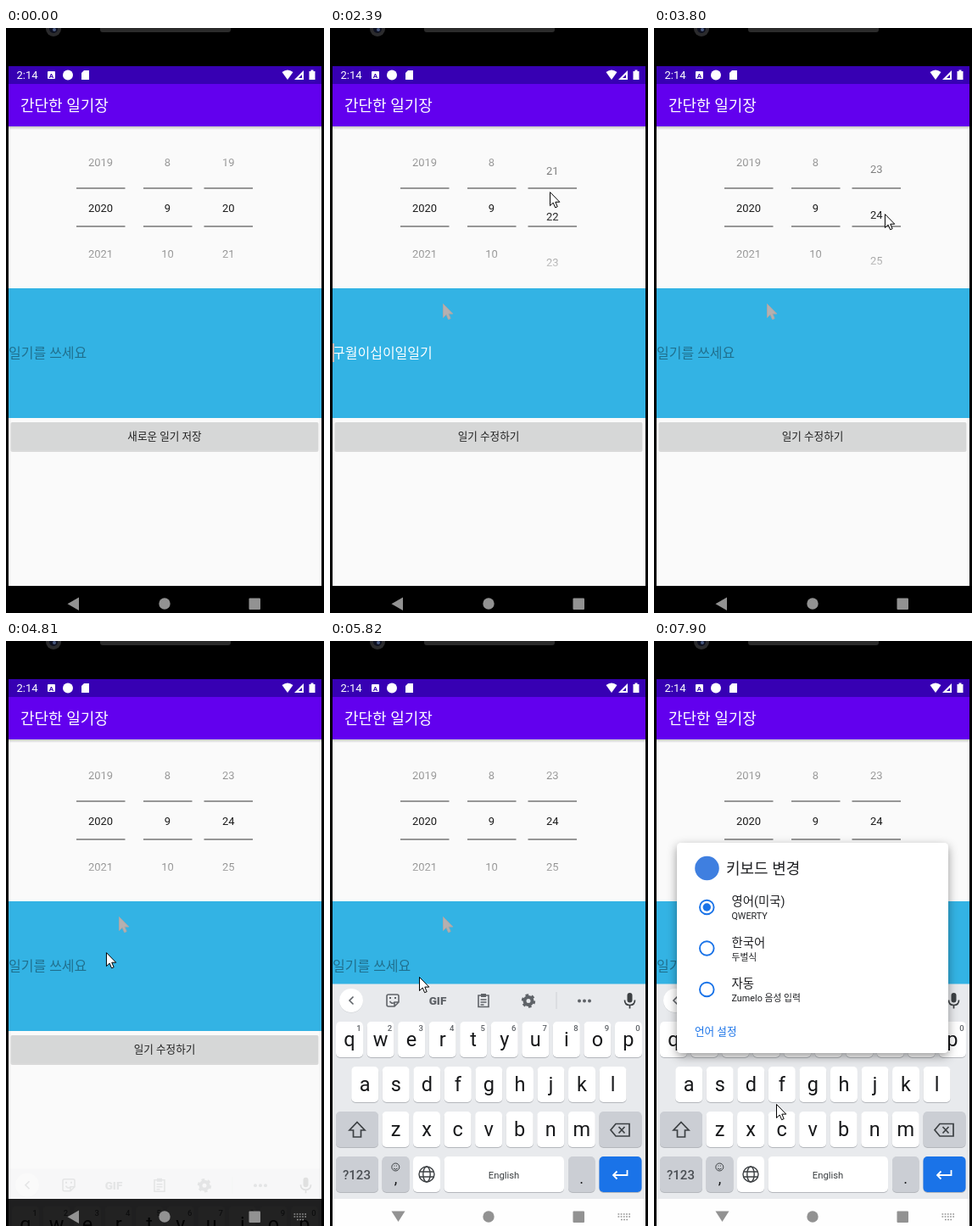
These frames come from a looping animation (375x690 px, 7990 ms). An HTML page:

```html
<!DOCTYPE html>
<html lang="ko">
<head>
<meta charset="utf-8">
<style>
html, body { margin: 0; width: 100%; height: 100%; overflow: hidden; background: #000; }
svg { display: block; width: 375px; height: 690px; font-family: Roboto, "Noto Sans CJK KR", sans-serif; }
.mid { text-anchor: middle; }
.line { fill: none; stroke: #5f6368; stroke-width: 1.6; }
</style>
</head>
<body>
<svg viewBox="0 0 375 690">
  <defs>
    <linearGradient id="fade" gradientUnits="userSpaceOnUse" x1="0" y1="122" x2="0" y2="302">
      <stop offset="0" stop-color="#fff" stop-opacity="0"/>
      <stop offset=".467" stop-color="#fff"/>
      <stop offset=".533" stop-color="#fff"/>
      <stop offset="1" stop-color="#fff" stop-opacity="0"/>
    </linearGradient>
    <mask id="wheel" maskUnits="userSpaceOnUse" x="0" y="122" width="375" height="180">
      <rect y="122" width="375" height="180" fill="url(#fade)"/>
    </mask>
    <linearGradient id="barShade" x2="0" y2="1">
      <stop stop-opacity=".22"/><stop offset="1" stop-opacity="0"/>
    </linearGradient>
    <filter id="soft" x="-10%" y="-10%" width="120%" height="125%">
      <feDropShadow dx="0" dy="4" stdDeviation="6" flood-opacity=".4"/>
    </filter>
    <clipPath id="screen"><path d="M3 45H372V690H3z"/></clipPath>
    <path id="arrow" d="M.5.5v16l3.7-3.5 2.4 5.7 2.6-1.1-2.4-5.5h5z"/>
  </defs>

  <rect width="375" height="690"/>
  <circle cx="56" cy="1" r="9" fill="#2b2b2d"/>
  <circle cx="56" cy="1" r="5" fill="#0d1020"/>
  <circle cx="57" cy="2" r="2" fill="#4a5a80"/>
  <path d="M111 0H265V2q0 3-3 3H114q-3 0-3-3z" fill="#2b2b2b"/>

  <g clip-path="url(#screen)">
    <rect x="3" y="116" width="369" height="542" fill="#fafafa"/>
    <rect x="3" y="116" width="369" height="4" fill="url(#barShade)"/>
    <rect x="3" y="45" width="369" height="21" fill="#3700b3"/>
    <rect x="3" y="66" width="369" height="50" fill="#6200ee"/>
    <g fill="#fff">
      <text x="12.5" y="60" font-size="13">2:14</text>
      <rect x="49" y="51" width="9" height="9" rx="1"/>
      <text class="mid" x="53.5" y="58.6" font-size="8" font-weight="700" fill="#3700b3">A</text>
      <circle cx="73" cy="55.5" r="6"/>
      <path d="M92 50h6v11h-9V53z"/>
      <path d="M325.500 52q6.500-5 13 0L332 61z"/>
      <path d="M351 50V61H340z"/>
      <path d="M359.500 49.500h3V51h2V61h-7V51h2z"/>
      <text x="17" y="97.500" font-size="18">간단한 일기장</text>
    </g>
    <path d="M345 59l4-4v4z" fill="#3700b3"/>

    <g id="picker" class="mid" mask="url(#wheel)" font-size="13" fill="#1c1c1c"></g>
    <path d="M83 189h57.500M162 189h57.500M233.500 189h57.500M83 234h57.500M162 234h57.500M233.500 234h57.500" stroke="#757575" stroke-width="1.6"/>

    <rect x="3" y="307" width="369" height="153" fill="#33b3e4"/>
    <text id="note" x="3" y="389" font-size="16"></text>
    <rect id="caret" x="3" y="372" width="2" height="22" fill="#cdb6b0"/>

    <rect x="5.500" y="465" width="363" height="35" rx="2" fill="#000" opacity=".13"/>
    <rect x="6" y="465" width="362" height="33" rx="2" fill="#d6d7d7"/>
    <text id="save" class="mid" x="187" y="486" font-size="12.6" fill="#202020"></text>

    <g id="board"></g>

    <g fill="#929292">
      <path id="back"/>
      <circle cx="187" cy="679" r="6.700"/>
      <rect x="286.500" y="672.500" width="13.500" height="13.500" rx="1"/>
      <path id="imeIcon" d="M339.500 676h15M339.500 679h15M343 682.500h8" stroke="#929292" stroke-width="1.7" stroke-dasharray="1.700 1.500"/>
    </g>
  </g>

  <use id="ghost" href="#arrow" x="133" y="325" fill="#b5b0b0" stroke="#aaa6a6"/>

  <g id="dialog">
    <rect x="27" y="238" width="320" height="248" rx="5" fill="#fff" filter="url(#soft)"/>
    <circle cx="62.500" cy="268" r="14.300" fill="#3f7fe0"/>
    <g fill="#202124">
      <text x="85" y="274.500" font-size="18">키보드 변경</text>
      <g id="options"></g>
    </g>
    <text x="48" y="465" font-size="12.6" fill="#1a73e8">언어 설정</text>
  </g>

  <g id="pointer">
    <circle id="press" r="12" fill="#fffa50" opacity=".78"/>
    <use href="#arrow" fill="#fff" stroke="#000"/>
  </g>
</svg>

<script>
const LOOP = 7990;
const $ = id => document.getElementById(id);
const clamp = v => Math.max(0, Math.min(1, v));
const show = (id, on) => $(id).setAttribute('visibility', on ? 'visible' : 'hidden');
const label = (s, x, y, size, extra = '') =>
  `<text x="${x}" y="${y}" font-size="${size}" ${extra}>${s}</text>`;

// Date wheels
const ROW = 54;
const column = (x, first, from, to) => {
  let out = '';
  for (let v = from; v <= to; v++) out += label(v, x, 216.6 + (v - first) * ROW, 13);
  return out;
};
$('picker').innerHTML = column(111.5, 2020, 2019, 2021) + column(190.5, 9, 8, 10) +
  `<g id="days">${column(262.3, 20, 18, 26)}</g>`;

// Keyboard
const WHITE = '#fff', GREY = '#cbced4', INK = '#17181a';
function key(x, y, w, fill, id = '') {
  return `<rect x="${x}" y="${y + 1}" width="${w}" height="42" rx="5" fill="#b4b7bc"/>` +
    `<rect ${id && `id="${id}"`} x="${x}" y="${y}" width="${w}" height="42" rx="5" fill="${fill}"/>`;
}
function letters(chars, x0, y, digits) {
  return [...chars].map((c, i) => {
    const x = x0 + i * 36.55;
    return key(x, y, 32, WHITE) + label(c, x + 16, y + 29, 23.5, `class="mid" fill="${INK}"`) +
      (digits ? label((i + 1) % 10, x + 27, y + 11, 9.5, 'class="mid" font-weight="500" fill="#5f6368"') : '');
  }).join('');
}
const toolbar = `
  <circle cx="25" cy="424.500" r="14" fill="#c9ccd0"/><circle cx="25" cy="424" r="14" fill="#fff"/>
  <path class="line" d="M27.500 419.500l-4.500 4.500 4.500 4.500"/>
  <path class="line" d="M69 417h10q2 0 2 2v7l-5 5h-7q-2 0-2-2v-10q0-2 2-2zM81 426h-5v5M70.500 425q2.500 3.500 5 1.500"/>
  <path d="M70 420h2v2h-2zM76 420h2v2h-2z" fill="#5f6368"/>
  ${label('GIF', 127, 429, 13.5, 'class="mid" font-weight="900" fill="#5f6368"')}
  <path class="line" d="M175 418h12v13.500h-12zM177.500 423h7M177.500 426h7M177.500 429h4"/>
  <path d="M178 416h6v4h-6z" fill="#5f6368"/>
  <circle cx="234" cy="424.500" r="6.700" fill="none" stroke="#5f6368" stroke-width="3" stroke-dasharray="3.500 3.516"/>
  <circle cx="234" cy="424.500" r="4.500" fill="none" stroke="#5f6368" stroke-width="4"/>
  <path d="M267 414v20" stroke="#cfd1d5"/>
  <g fill="#5f6368"><circle cx="294" cy="424.500" r="2"/><circle cx="300" cy="424.500" r="2"/><circle cx="306" cy="424.500" r="2"/></g>
  <rect x="350.500" y="415" width="6" height="11.500" rx="3" fill="#3c4043"/>
  <path d="M347.500 423.500q0 6 6 6t6-6M353.500 429.500v4" fill="none" stroke="#3c4043" stroke-width="1.700"/>`;
const bottomRow = key(7, 608, 50, GREY) + key(61.5, 608, 32, GREY) + key(98, 608, 32, WHITE) +
  key(134.5, 608, 141.5, WHITE, 'space') + key(281, 608, 31.5, GREY) + key(317.5, 608, 50, '#1a73e8') +
  label('?123', 31.5, 635, 15, 'class="mid" font-weight="500" fill="#4b4f54"') +
  label(',', 77.5, 640, 18, `class="mid" fill="${INK}"`) +
  label('.', 296.5, 640, 18, `class="mid" fill="${INK}"`) +
  label('English', 205, 633.5, 11.3, 'class="mid" fill="#3c4043"') + `
  <g fill="none" stroke="#3c4043">
    <circle cx="77.300" cy="620.500" r="4.500"/><path d="M75 622q2.300 2.500 4.600 0M75.500 619h1M78 619h1"/>
    <g stroke-width="1.400"><circle cx="114" cy="629" r="9"/><ellipse cx="114" cy="629" rx="4.200" ry="9"/>
    <path d="M106 626h16M106 632h16"/></g>
  </g>
  <path d="M350.500 624v6h-16M338.500 625.500l-4.500 4.500 4.500 4.500" fill="none" stroke="#fff" stroke-width="1.800"/>`;
$('board').innerHTML = `
  <rect x="3" y="404.500" width="369" height="254" fill="#e8eaed"/>
  <rect x="3" y="658" width="369" height="34" fill="#fefefe"/>` + toolbar +
  letters('qwertyuiop', 7, 449, true) + letters('asdfghjkl', 25.2, 502) + letters('zxcvbnm', 61.5, 555) +
  key(7, 555, 50, GREY) + key(317.5, 555, 50, GREY) + `
  <g fill="none" stroke="#3c4043" stroke-width="1.700">
    <path d="M32 567.500l9 9.500h-4.500v8h-9v-8H23z"/>
    <path d="M337 569.500h16v14.500h-16l-6-7.250zM340.500 573l7 7.500M347.500 573l-7 7.500"/>
  </g>` + bottomRow;

// Dialog choices
$('options').innerHTML = [['영어(미국)', 'QWERTY'], ['한국어', '두벌식'], ['자동', 'Zumelo 음성 입력']].map(([a, b], i) => {
  const y = 314 + i * 48.5;
  return `<circle cx="62.300" cy="${y}" r="8.300" fill="none" stroke="#1a73e8" stroke-width="1.900"/>` +
    (i ? '' : `<circle cx="62.300" cy="${y}" r="4.700" fill="#1a73e8"/>`) +
    label(a, 91.5, y - 2, 14.4) + label(b, 91.5, y + 14, 10.8);
}).join('');

// [start, end, from, to, deceleration]
const scrolls = [
  [1380, 1600, 0, 50, 1], [1600, 2250, 50, 87, 2], [2290, 3090, 87, 108, 5],
  [2950, 3150, 108, 165, 1], [3150, 3560, 165, 193, 2], [3660, 4460, 193, 216, 5]
];
function scrollAt(t) {
  const seg = scrolls.filter(s => t >= s[0]).pop();
  if (!seg) return 0;
  const [a, b, from, to, power] = seg;
  return from + (to - from) * (1 - (1 - clamp((t - a) / (b - a))) ** power);
}

// [time, x, y]
const path = [
  [240, 345, 661], [1010, 268, 250], [1160, 268, 250], [1380, 267, 226], [1450, 267, 210],
  [1600, 264, 176], [2000, 258, 180], [2390, 259, 193], [2900, 275, 262], [2950, 275, 262],
  [3150, 272, 205], [3560, 272, 217], [3710, 272, 217], [3800, 272, 219], [4000, 262, 245],
  [4500, 135, 358], [4720, 120, 363], [4810, 118, 367], [5030, 105, 396], [6400, 105, 396],
  [6850, 148, 669], [7030, 152, 641], [7640, 152, 641], [7890, 144, 546], [LOOP, 144, 546]
];
function pointerAt(t) {
  const i = Math.max(1, path.findIndex(k => k[0] >= t));
  const [a, x, y] = path[i - 1], [b, x2, y2] = path[i];
  const u = clamp((t - a) / (b - a));
  return [x + (x2 - x) * u, y + (y2 - y) * u];
}

const presses = [[1380, 1600], [2950, 3150], [4690, 4780], [7020, 7660]];
const notes = ['', '구월이십일일일기', '구월이십이일일기', '구월이십삼일일기', ''];

function draw(t) {
  const scroll = scrollAt(t), day = Math.round(scroll / ROW), note = notes[day];
  $('days').setAttribute('transform', `translate(0 ${-scroll})`);
  $('note').textContent = note || '일기를 쓰세요';
  $('note').setAttribute('fill', note ? '#fff' : 'rgba(0,0,0,.38)');
  $('save').textContent = day ? '일기 수정하기' : '새로운 일기 저장';
  show('caret', t > 270 && (t - 270) % 1000 < 500);

  const u = clamp((t - 4795) / 240);
  $('board').setAttribute('transform', `translate(0 ${250 * (1 - u) ** 2})`);
  $('board').setAttribute('opacity', clamp(u * 2));
  show('imeIcon', u > 0);
  $('back').setAttribute('d', u > .5 ? 'M72.500 672.500h16l-8 12.500z' : 'M86 671.500v15.500l-13.500-7.750z');

  $('space').setAttribute('fill', t > 7020 && t < 7700 ? '#d5d8dc' : WHITE);
  $('dialog').setAttribute('opacity', clamp((t - 7640) / 210));

  show('ghost', t >= 240 && t < 7640);
  $('pointer').setAttribute('display', t < 240 ? 'none' : 'inline');
  $('pointer').setAttribute('transform', `translate(${pointerAt(t)})`);
  $('press').setAttribute('display', presses.some(([a, b]) => t >= a && t < b) ? 'inline' : 'none');
}

const began = performance.now();
function tick() {
  draw((performance.now() - began) % LOOP);
  requestAnimationFrame(tick);
}
tick();
</script>
</body>
</html>
```
